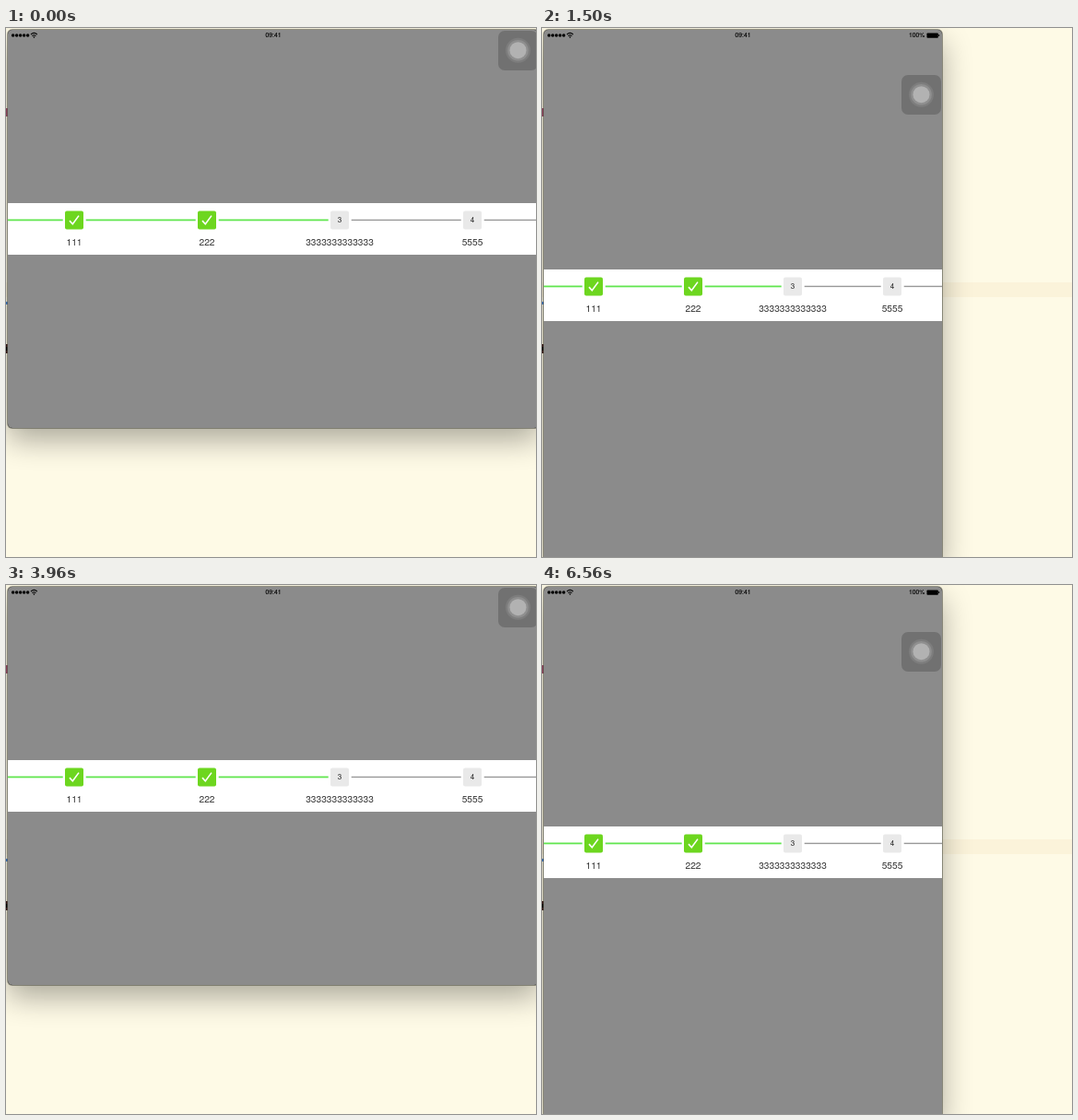
An HTML page that plays this animation: 575 px wide and 574 px high, repeating every 8 s.

```html
<!DOCTYPE html>
<html lang="en">
<head>
<meta charset="utf-8">
<title>Step bar on a rotating tablet</title>
<style>
  html, body { margin: 0; width: 100%; height: 100%; overflow: hidden; background: #fefae6; }
  #stage { position: absolute; inset: 0; overflow: hidden; }
  .band { position: absolute; left: 0; right: 0; top: 276px; height: 16px; background: #fbf3da; }
  .mark { position: absolute; left: 0; width: 2px; }
  #win {
    position: absolute; left: 2px; top: 2px; overflow: hidden;
    border-radius: 5px; background: #000;
    box-shadow: 0 0 0 1px rgba(95, 95, 80, .65), 0 13px 32px rgba(0, 0, 0, .33);
  }
  #win svg { position: absolute; display: block; }
  text { font-family: "Helvetica Neue", "Liberation Sans", Arial, sans-serif; }
  .mid { text-anchor: middle; }
  .status { font-size: 6.8px; fill: #000; stroke: #000; stroke-width: .15px; }
  .label { font-size: 10.2px; fill: #333; }
  .num { font-size: 8px; fill: #222; }
</style>
</head>
<body>
<div id="stage">
  <div class="band"></div>
  <div class="mark" style="top:87px;height:9px;background:#a04a68"></div>
  <div class="mark" style="top:297px;height:3px;background:#3f7fd0"></div>
  <div class="mark" style="top:343px;height:10px;background:#3a1616"></div>
  <div class="mark" style="top:346px;height:4px;background:#000"></div>
  <div id="win"></div>
</div>
<script>
const LONG = 576, SHORT = 432, LOOP = 8000;
const LABELS = ['111', '222', '3333333333333', '5555'];
const DONE = 2;
const win = document.getElementById('win');

const rect = (x, y, w, h, fill, r = 0) =>
  `<rect x="${x}" y="${y}" width="${w}" height="${h}" rx="${r}" fill="${fill}"/>`;
const circle = (x, y, r, fill) => `<circle cx="${x}" cy="${y}" r="${r}" fill="${fill}"/>`;
const text = (x, y, cls, s) => `<text x="${x}" y="${y}" class="${cls}">${s}</text>`;

function statusBar(w) {
  let s = '';
  for (let i = 0; i < 5; i++) s += circle(5.6 + i * 4, 6.1, 1.75, '#000');
  s += `<g fill="none" stroke="#000" stroke-width="1.1">
    <path d="M25 5Q28.4 1.9 31.8 5M26.4 6.6Q28.4 4.8 30.4 6.6"/></g>
    <path d="M27.2 7.7Q28.4 6.8 29.6 7.7L28.4 9Z"/>`;
  return s + text(w / 2, 8.4, 'status mid', '09:41')
    + text(w - 36, 8.4, 'status', '100%')
    + rect(w - 16.5, 3.5, 12.3, 5.2, '#000', .8)
    + rect(w - 3.8, 5.1, 1, 2, '#000', .4);
}

function stepBar(w, top) {
  const gap = w / 4, y = top + 18.5;
  let s = rect(0, top, w, 56, '#fff');
  for (let i = 0; i <= 4; i++) {
    const from = i ? (i - .5) * gap + 12.7 : 0;
    const to = i < 4 ? (i + .5) * gap - 12.3 : w;
    const on = i <= DONE, thick = on ? 1.8 : 1.4;
    s += rect(from, y - thick / 2 - .1, to - from, thick, on ? '#62e650' : '#999');
  }
  LABELS.forEach((label, i) => {
    const x = (i + .5) * gap, on = i < DONE;
    s += rect(x - 10, y - 10, 20, 20, on ? '#6dd61f' : '#e9e9e9', 2);
    s += on
      ? `<path d="M${x - 5} ${y + .6}l3.3 3.7l6.7-9.2" fill="none" stroke="#fff" stroke-width="1.6"/>`
      : text(x, y + 2.8, 'num mid', i + 1);
    s += text(x, top + 46, 'label mid', label);
  });
  return s;
}

function touchButton(x, y) {
  return rect(x, y, 43, 43, '#717171', 7)
    + circle(x + 21.5, y + 21.2, 13.5, '#7d7d7d')
    + circle(x + 21.5, y + 21.2, 11.3, '#8f8f8f')
    + circle(x + 21.5, y + 21.2, 9, '#b2b2b2');
}

function makeScreen(w, h, touchY) {
  const svg = document.createElementNS('http://www.w3.org/2000/svg', 'svg');
  svg.setAttribute('viewBox', `0 0 ${w} ${h}`);
  svg.setAttribute('preserveAspectRatio', 'none');
  svg.innerHTML = rect(0, 0, w, h, '#8b8b8b') + stepBar(w, h / 2 - 28)
    + statusBar(w) + touchButton(w - 44, touchY);
  win.append(svg);
  return svg;
}

const wide = makeScreen(LONG, SHORT, 1);
const tall = makeScreen(SHORT, LONG, 49);

// Each turn: redraw times, ease start and length, moment the new layout appears
const TURNS = [
  { ticks: [500, 560, 610, 670, 730, 790], start: 500, dur: 265, settle: 1500, toTall: true },
  { ticks: [3140, 3260, 3310, 3370, 3420], start: 3200, dur: 220, settle: 3960, toTall: false },
  { ticks: [5850, 5910, 5970, 6020, 6080], start: 5850, dur: 230, settle: 6560, toTall: true }
];

function ease(x) {
  x = Math.min(1, Math.max(0, x));
  return (x + (1 - Math.cos(Math.PI * x)) / 2) / 2;
}

function place(el, x, y, w, h) {
  Object.assign(el.style, { left: x + 'px', top: y + 'px', width: w + 'px', height: h + 'px' });
}

function draw(t) {
  const turn = TURNS.filter(k => t >= k.ticks[0]).pop();
  let tallness = 0, showTall = false, aspect = LONG / SHORT;
  if (turn) {
    const tick = turn.ticks.filter(k => k <= t).pop();
    const p = ease((tick - turn.start) / turn.dur);
    tallness = turn.toTall ? p : 1 - p;
    showTall = (t >= turn.settle) === turn.toTall;
    if (turn.toTall) aspect = SHORT / LONG;
  }
  const w = LONG - (LONG - SHORT) * tallness;
  const h = SHORT + (LONG - SHORT) * tallness;
  const sw = Math.min(w, h * aspect), sh = Math.min(h, w / aspect);
  place(win, 2, 2, w, h);
  wide.style.display = showTall ? 'none' : 'block';
  tall.style.display = showTall ? 'block' : 'none';
  place(showTall ? tall : wide, (w - sw) / 2, (h - sh) / 2, sw, sh);
}

const began = performance.now();
function loop() {
  draw((performance.now() - began) % LOOP);
  requestAnimationFrame(loop);
}
loop();
</script>
</body>
</html>
```
